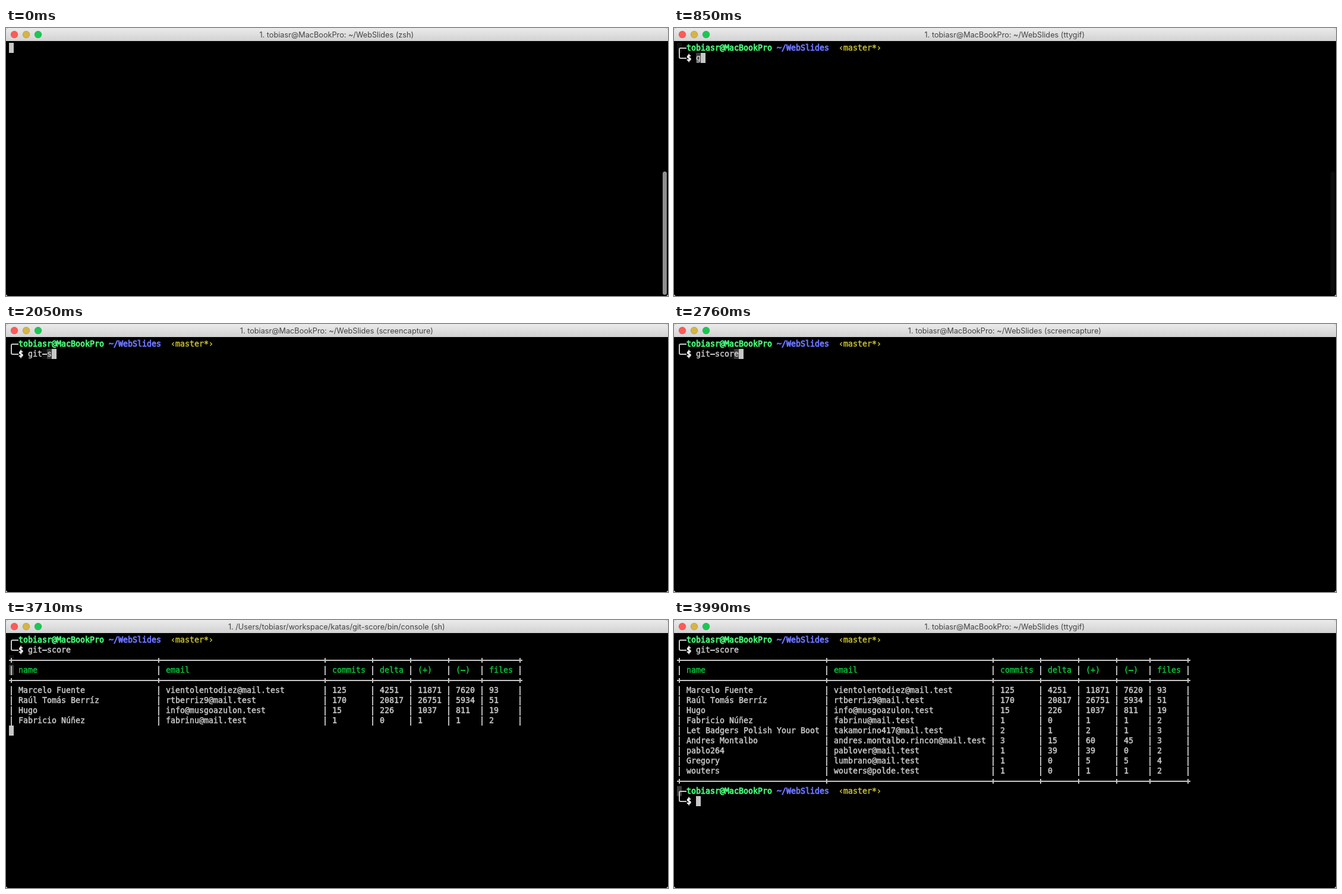
Recreate the animation shown at these times as an HTML page with a canvas. Size 1114 by 452 pixels, loop 4.92 s.

```html
<!DOCTYPE html>
<html lang="en">
<head>
<meta charset="utf-8">
<title>Terminal</title>
<style>
html, body { margin: 0; width: 100%; height: 100%; overflow: hidden; background: #fff; }
canvas { display: block; }
</style>
</head>
<body>
<canvas id="stage" width="1114" height="452"></canvas>
<script>
const ctx = document.getElementById('stage').getContext('2d');
const W = 1114, H = 452, LOOP = 4920;
const CELL = 8, LINE = 17, LEFT = 5, TOP = 25;
const GREY = '#c7c7c7';
const USER = 'tobiasr';
const COMMAND = 'git-score';

const shell = app => `1. ${USER}@MacBookPro: ~/WebSlides (${app})`;
const script = app => `1. /Users/${USER}/workspace/katas/git-score/bin/console (${app})`;

// Start time, title, typed letters, cursor row and column, table lines
const states = [
  [0, shell('zsh'), -1, 0, 0, 0],
  [80, shell('ttygif'), 0, 1, 4, 0],
  [850, shell('ttygif'), 1, 1, 5, 0],
  [990, shell('ttygif'), 2, 1, 6, 0],
  [1130, shell('ttygif'), 3, 1, 7, 0],
  [1490, shell('ttygif'), 4, 1, 8, 0],
  [2050, shell('screencapture'), 5, 1, 9, 0],
  [2270, shell('screencapture'), 6, 1, 10, 0],
  [2420, shell('screencapture'), 7, 1, 11, 0],
  [2560, shell('screencapture'), 8, 1, 12, 0],
  [2760, shell('screencapture'), 9, 1, 13, 0],
  [3230, shell('screencapture'), 9, 2, 0, 0],
  [3330, script('sh'), 9, 2, 0, 0],
  [3610, script('sh'), 9, 3, 0, 1],
  [3710, script('sh'), 9, 9, 0, 7],
  [3810, script('screencapture'), 9, 15, 0, 13],
  [3910, shell('ttygif'), 9, 15, 0, 13],
  [3990, shell('ttygif'), 9, 16, 4, 13]
];

const borders = [0, 31, 66, 76, 84, 92, 99, 107];
const header = 'name|email|commits|delta|(+)|(-)|files';
const people = [
  'Marcelo Fuente|vientolentodiez@mail.test|125|4251|11871|7620|93',
  'Raúl Tomás Berríz|rtberriz9@mail.test|170|20817|26751|5934|51',
  'Hugo|info@musgoazulon.test|15|226|1037|811|19',
  'Fabricio Núñez|fabrinu@mail.test|1|0|1|1|2',
  'Let Badgers Polish Your Boot|takamorino417@mail.test|2|1|2|1|3',
  'Andres Montalbo|andres.montalbo.rincon@mail.test|3|15|60|45|3',
  'pablo264|pablover@mail.test|1|39|39|0|2',
  'Gregory|lumbrano@mail.test|1|0|5|5|4',
  'wouters|wouters@polde.test|1|0|1|1|2'
];
const table = [null, header, null, ...people, null];

const colX = col => LEFT + col * CELL;
const rowY = row => TOP + row * LINE;

function block(row, col, color) {
  ctx.fillStyle = color;
  ctx.fillRect(colX(col), rowY(row), CELL, LINE);
}

function dash(row, col, count = 1) {
  ctx.fillRect(colX(col), rowY(row) + 8, count * CELL, 2);
}

function write(text, row, col, color, weight = 0.5) {
  ctx.font = '13.3px "DejaVu Sans Mono", monospace';
  ctx.textAlign = 'left';
  ctx.fillStyle = ctx.strokeStyle = color;
  ctx.lineWidth = weight;
  [...text].forEach((char, i) => {
    if (char === '-') return dash(row, col + i);
    const x = colX(col + i), y = rowY(row) + 13;
    ctx.fillText(char, x, y);
    ctx.strokeText(char, x, y);
  });
}

function prompt(row) {
  const x = colX(0) + 4, y = rowY(row) + 9;
  ctx.strokeStyle = GREY;
  ctx.lineWidth = 2;
  ctx.beginPath();
  ctx.moveTo(colX(2), y);
  ctx.arcTo(x, y, x, y + 5, 2);
  ctx.lineTo(x, y + 12);
  ctx.arcTo(x, y + LINE, x + 5, y + LINE, 2);
  ctx.lineTo(colX(2), y + LINE);
  ctx.stroke();
  write(USER + '@MacBookPro', row, 2, '#47f978', 0.9);
  write('~/WebSlides', row, 21, '#6b73ff', 0.9);
  write('‹master*›', row, 34, '#c7bf2f');
  write('$', row + 1, 2, '#fff', 0.9);
}

function rule(row) {
  ctx.fillStyle = GREY;
  dash(row, 0, 108);
  for (const col of borders) ctx.fillRect(colX(col) + 3, rowY(row) + 5, 2, 8);
}

function tableLine(cells, row) {
  if (!cells) return rule(row);
  const color = cells === header ? '#0cbf3c' : GREY;
  for (const col of borders) write('|', row, col, GREY, 0.8);
  cells.split('|').forEach((text, i) => write(text, row, borders[i] + 2, color));
}

function titleBar(title) {
  const shade = ctx.createLinearGradient(0, 0, 0, 22);
  shade.addColorStop(0, '#ebebeb');
  shade.addColorStop(1, '#d2d2d2');
  ctx.fillStyle = shade;
  ctx.fillRect(0, 0, W, 22);
  ['#fc5b57', '#d5b446', '#1bc653'].forEach((color, i) => {
    ctx.fillStyle = color;
    ctx.strokeStyle = 'rgba(0,0,0,.14)';
    ctx.lineWidth = 1;
    ctx.beginPath();
    ctx.arc(14 + i * 20, 11, 6, 0, Math.PI * 2);
    ctx.fill();
    ctx.stroke();
  });
  ctx.font = '12.7px Inter, sans-serif';
  ctx.textAlign = 'center';
  ctx.fillStyle = '#444';
  ctx.fillText(title, 556.3, 16);
}

function scrollbar(color) {
  ctx.fillStyle = color;
  ctx.beginPath();
  ctx.roundRect(1105, 242, 7, 208, 3.5);
  ctx.fill();
}

function draw(time) {
  const now = states.findLastIndex(state => state[0] <= time);
  const [, title, typed, row, col, lines] = states[now];

  ctx.fillStyle = '#fff';
  ctx.fillRect(0, 0, W, H);
  ctx.save();
  ctx.beginPath();
  ctx.roundRect(0, 0, W, H, 4);
  ctx.clip();
  ctx.fillStyle = '#000';
  ctx.fillRect(0, 0, W, H);
  titleBar(title);
  if (now < 3) scrollbar(['#8f8f8f', '#2a2a2a', '#0b0b0b'][now]);

  // Afterglow of the last two cursor places
  [[2, '#101010'], [1, '#3c3c3c']].forEach(([back, color]) => {
    const past = states[now - back];
    if (past) block(past[3], past[4], color);
  });

  if (typed >= 0) {
    prompt(0);
    write(COMMAND.slice(0, typed), 1, 4, GREY);
  }
  table.slice(0, lines).forEach((cells, i) => tableLine(cells, i + 2));
  if (row === 16) prompt(15);
  block(row, col, GREY);
  ctx.restore();
}

const start = performance.now();
function tick() {
  draw((performance.now() - start) % LOOP);
  requestAnimationFrame(tick);
}
tick();
</script>
</body>
</html>
```
